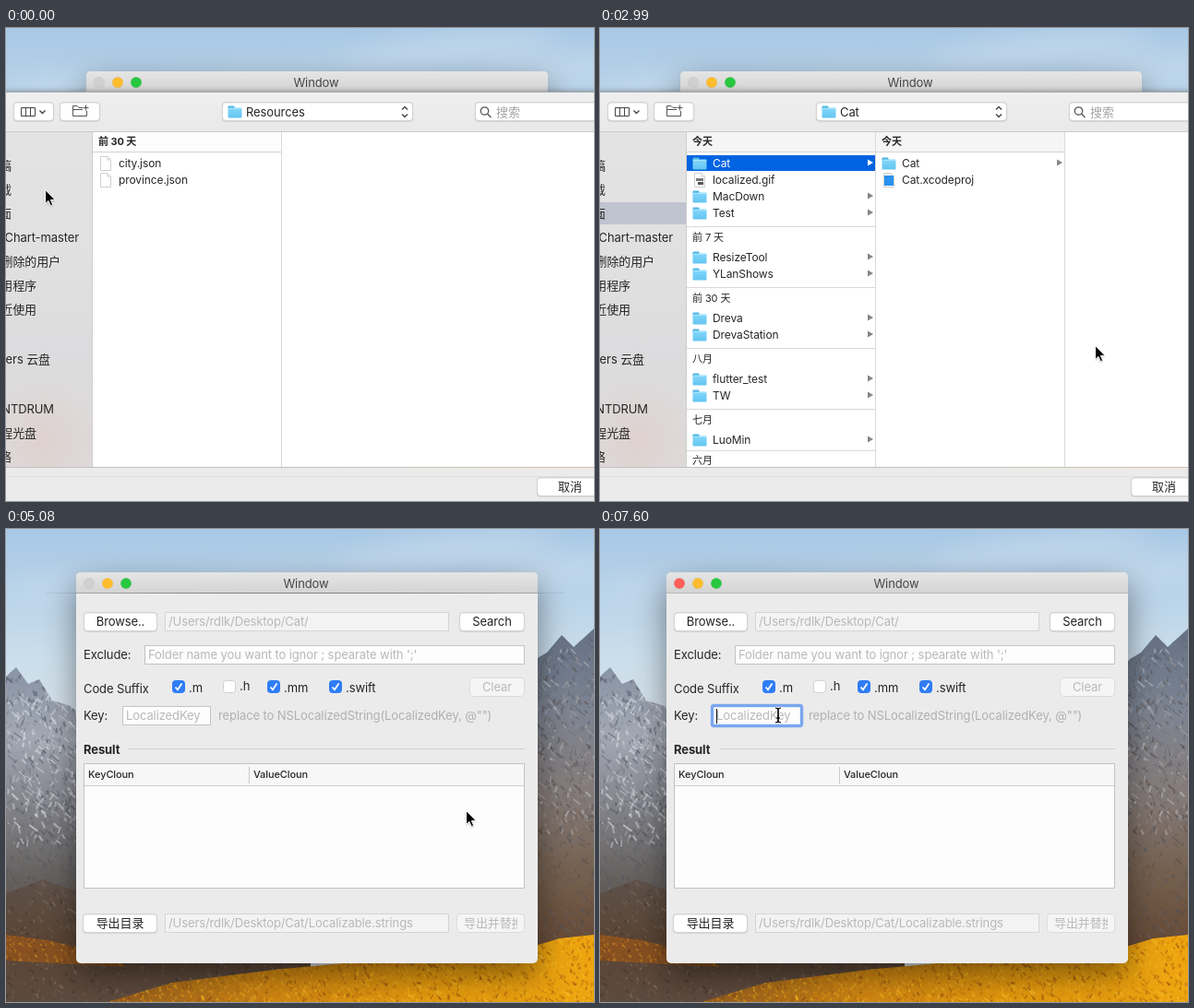
An HTML page with a canvas that plays this animation: 637x513 px, repeating every 8000 ms.

```html
<!DOCTYPE html>
<html lang="zh">
<head>
<meta charset="utf-8">
<style>
html, body { margin: 0; width: 100%; height: 100%; overflow: hidden; }
canvas { display: block; }
</style>
</head>
<body>
<canvas width="637" height="513"></canvas>
<script>
const W = 637, H = 513, LOOP = 8000, TICK = 149;
const screen = document.querySelector('canvas').getContext('2d');
let c = screen;

const smooth = p => p * p * (3 - 2 * p);
let seed = 7;
const rnd = () => (seed = seed * 16807 % 2147483647) / 2147483647;

// ---- drawing helpers ----
function text(s, x, y, { size = 13, color = '#262626', weight = 400, align = 'left' } = {}) {
  c.font = `${weight} ${size}px Inter, "Noto Sans CJK SC", "Noto Sans CJK", sans-serif`;
  c.letterSpacing = '-0.1px';
  c.textAlign = align;
  c.fillStyle = color;
  c.fillText(s, x, y + Math.round(size * .36));
}
function rect(x, y, w, h, fill) {
  c.fillStyle = fill;
  c.fillRect(x, y, w, h);
}
function box(x, y, w, h, r, fill, stroke, lineWidth = 1) {
  c.beginPath();
  c.roundRect(x + .5, y + .5, w - 1, h - 1, r);
  if (fill) { c.fillStyle = fill; c.fill(); }
  if (stroke) { c.strokeStyle = stroke; c.lineWidth = lineWidth; c.stroke(); }
}
function panel(x, y, w, h, radii, fill) {
  c.beginPath();
  c.roundRect(x, y, w, h, radii);
  c.fillStyle = fill;
  c.fill();
}
function poly(points, fill) {
  c.beginPath();
  points.forEach(([x, y]) => c.lineTo(x, y));
  c.closePath();
  if (fill) { c.fillStyle = fill; c.fill(); }
}
function line(points, color, width = 1) {
  c.beginPath();
  points.forEach(([x, y]) => c.lineTo(x, y));
  c.strokeStyle = color;
  c.lineWidth = width;
  c.stroke();
}
function dot(x, y, r, fill) {
  c.beginPath();
  c.arc(x, y, r, 0, 7);
  c.fillStyle = fill;
  c.fill();
}
function fade(x0, y0, x1, y1, ...colors) {
  const g = c.createLinearGradient(x0, y0, x1, y1);
  colors.forEach((col, i) => g.addColorStop(i / (colors.length - 1), col));
  return g;
}
function shadow(color, blur, dy) {
  c.shadowColor = color;
  c.shadowBlur = blur;
  c.shadowOffsetY = dy;
}
function button(x, y, w, label, enabled = true) {
  c.save();
  if (enabled) shadow('rgba(0,0,0,.14)', 1, .6);
  box(x, y, w, 21, 3.5, enabled ? '#fff' : '#f5f5f5', enabled ? '#d4d4d4' : '#dcdcdc');
  c.restore();
  if (label) text(label, x + w / 2, y + 10, { align: 'center', color: enabled ? '#222' : '#b9b9b9' });
}

// ---- wallpaper ----
function speckle(shape, base, colors, count, size, top, bottom) {
  c.save();
  poly(shape, base);
  c.clip();
  const xs = shape.map(p => p[0]), left = Math.min(...xs), width = Math.max(...xs) - left;
  for (let i = 0; i < count; i++) {
    const x = left + rnd() * width, y = top + rnd() * (bottom - top), l = size * (.4 + rnd());
    c.globalAlpha = .15 + rnd() * .45;
    line([[x, y], [x + (rnd() - .35) * l * 1.6, y + l * .7]], colors[rnd() * colors.length | 0], 1 + rnd() * 1.4);
  }
  c.restore();
}
function makeWallpaper() {
  const canvas = document.createElement('canvas');
  canvas.width = W;
  canvas.height = H;
  c = canvas.getContext('2d');
  rect(0, 0, W, H, fade(0, 0, 0, 210, '#a8c8e5', '#b9d3e9', '#cbdeeb', '#d6e1e9'));
  c.filter = 'blur(14px)';
  c.fillStyle = 'rgba(226,236,244,.35)';
  for (const [x, y, w, h] of [[480, 25, 120, 18], [590, 45, 80, 14], [250, 58, 150, 9], [60, 62, 60, 8]]) {
    c.beginPath();
    c.ellipse(x, y, w, h, -.12, 0, 7);
    c.fill();
  }
  c.filter = 'none';
  const left = [[0, 160], [11, 150], [24, 168], [36, 163], [50, 186], [70, 192], [92, 214], [110, H], [0, H]];
  const right = [[555, 165], [574, 141], [586, 134], [602, 115], [615, 128], [626, 118], [W, 108], [W, H], [555, H]];
  speckle(left, fade(0, 150, 0, 450, '#8893a4', '#a3a8b3', '#83848b', '#66625f', '#574a41'), ['#4a5262', '#676c78', '#565861'], 700, 7, 150, 420);
  speckle(left, 'transparent', ['#eef0f3', '#d6dae1'], 330, 8, 175, 340);
  speckle(right, fade(0, 110, 0, 460, '#657286', '#7d8492', '#857c7a', '#75604f', '#644733'), ['#4a505c', '#6d6a6c', '#5a4a42'], 600, 7, 115, 440);
  speckle(right, 'transparent', ['#c5cad2', '#b0a7a2'], 170, 7, 130, 330);
  speckle([[0, 395], [40, 380], [110, 405], [330, 465], [330, H], [0, H]], fade(0, 380, 0, H, '#5e524a', '#594434', '#5d4a3f'),
    ['#3b2f28', '#7b6757', '#6b4a30', '#8a7868'], 900, 5, 380, H);
  speckle([[0, 440], [45, 446], [110, 462], [130, 475], [0, 468]], '#875020', ['#cf8a1e', '#4a2f1d', '#b3701e', '#dfa12b'], 260, 4, 440, 475);
  speckle([[110, H], [180, 492], [290, 478], [420, 466], [570, 453], [600, 444], [W, 440], [W, H]], fade(110, 0, W, 0, '#8f5a20', '#cf8612', '#e59a0d', '#eda510'),
    ['#f6c32a', '#a85b0e', '#f0a312', '#80450f', '#fbb91b', '#d07c09'], 2400, 5, 440, H);
  c = screen;
  return canvas;
}
const wallpaper = makeWallpaper();

// ---- app window ----
const FIELDS = { exclude: [74, 126, 412], key: [50, 192, 96] };

function field(x, y, w, placeholder, focused, editable = true) {
  box(x, y, w, 21, 0, editable ? '#fdfdfd' : '#f3f3f3', editable ? '#c3c3c3' : '#d4d4d4');
  if (focused) box(x - 1, y - 1, w + 2, 23, 2, null, '#7aa6ee', 3.4);
  text(placeholder, x + 4, y + 10, { color: '#b8b8b8' });
}
function checkbox(x, on, label) {
  box(x, 164, 14, 14, 3, on ? '#2f7df6' : '#fff', on ? '#2f7df6' : '#d0d0d0');
  if (on) line([[x + 3.5, 171.5], [x + 6, 174.3], [x + 10.5, 167.5]], '#fff', 1.8);
  text(label, x + 18, on ? 172 : 170);
}
function appWindow(x, active, focus, caret) {
  c.save();
  c.translate(x, 0);
  c.save();
  shadow('rgba(0,0,0,.45)', 34, 13);
  panel(0, 47, 500, 424, 5, '#ebebeb');
  c.restore();
  panel(0, 47, 500, 23, [5, 5, 0, 0], fade(0, 47, 0, 70, '#e5e5e5', '#d3d3d3'));
  rect(0, 69, 500, 1, '#bababa');
  [active ? '#ff5f57' : '#d0d0d0', '#ffbd2e', '#28c840'].forEach((col, i) => {
    dot(14 + i * 20, 59, 6, 'rgba(0,0,0,.1)');
    dot(14 + i * 20, 59, 5.8, col);
  });
  text('Window', 249, 59, { align: 'center', color: '#454545' });

  button(8, 90, 80, 'Browse..');
  field(96, 90, 308, '/Users/rdlk/Desktop/Cat/', false, false);
  button(415, 90, 71, 'Search');
  text('Exclude:', 8, 136);
  field(...FIELDS.exclude, "Folder name you want to ignor ; spearate with ';'", focus === 'exclude');
  text('Code Suffix', 8, 173);
  checkbox(104, true, '.m');
  checkbox(159, false, '.h');
  checkbox(207, true, '.mm');
  checkbox(274, true, '.swift');
  button(426, 161, 60, 'Clear', false);
  text('Key:', 8, 202);
  field(...FIELDS.key, 'LocalizedKey', focus === 'key');
  text('replace to NSLocalizedString(LocalizedKey, @"")', 154, 202, { color: '#b0b0b0' });
  if (focus && caret) {
    const [fx, fy] = FIELDS[focus];
    rect(fx + 4, fy + 3, 1, 16, '#111');
  }

  text('Result', 8, 239, { weight: 700 });
  rect(57, 238, 429, 1, '#d0d0d0');
  box(8, 254, 478, 136, 0, '#fdfdfd', '#c2c2c2');
  rect(9, 255, 476, 23, '#f7f7f7');
  rect(9, 278, 476, 1, '#cfcfcf');
  rect(187, 258, 1, 18, '#c9c9c9');
  text('KeyCloun', 13, 266, { size: 11, weight: 500 });
  text('ValueCloun', 192, 266, { size: 11, weight: 500 });

  button(7, 417, 81, '导出目录');
  field(96, 417, 308, '/Users/rdlk/Desktop/Cat/Localizable.strings', false, false);
  button(412, 417, 74, '', false);
  c.beginPath();
  c.rect(412, 417, 66, 21);
  c.clip();
  text('导出并替换', 420, 427, { color: '#b9b9b9' });
  c.restore();
}

// ---- open dialog ----
const SIDEBAR = [
  [149, 6, '文稿'], [175, 6, '下载'], [201, 6, '桌面'], [227, 79, 'Chart-master'], [253, 59, '删除的用户'],
  [279, 33, '应用程序'], [305, 33, '最近使用'], [359, 48, 'ers 云盘'], [413, 52, 'NTDRUM'], [439, 33, '远程光盘'], [465, 6, '网络']];
const RESOURCES = '#前 30 天,city.json,province.json';
const DESKTOP = '#今天,Cat,localized.gif,MacDown,Test,#前 7 天,ResizeTool,YLanShows,#前 30 天,Dreva,DrevaStation,' +
  '#八月,flutter_test,TW,#七月,LuoMin,#六月';
const CAT = '#今天,Cat,Cat.xcodeproj';

function folder(x, y) {
  box(x, y - 7, 8, 5, 1, '#53b6e4');
  box(x, y - 5, 16, 12, 1, fade(0, y - 5, 0, y + 7, '#84d8fb', '#62c4f0'));
  rect(x + 1, y - 4, 14, 1, '#a5e4fd');
}
function page(x, y) {
  poly([[x + 2.5, y - 7.5], [x + 10, y - 7.5], [x + 13.5, y - 4], [x + 13.5, y + 7.5], [x + 2.5, y + 7.5]], '#fff');
  c.strokeStyle = '#cfcfcf';
  c.lineWidth = 1;
  c.stroke();
  line([[x + 10, y - 7.5], [x + 10, y - 4], [x + 13.5, y - 4]], '#cfcfcf');
}
function icon(name, x, y) {
  const type = name.split('.')[1];
  if (!type) return folder(x, y);
  page(x, y);
  if (type === 'gif') {
    rect(x + 4, y - 2, 8, 3, '#777');
    rect(x + 6, y + 2, 6, 3, '#555');
  }
  if (type === 'xcodeproj') rect(x + 3, y - 5, 10, 11, '#2a92ee');
}
function column(list, x, selected) {
  rect(x, 113, 204, 363, '#fff');
  rect(x, 113, 204, 21, list === RESOURCES ? '#fdfdfd' : '#f5f5f5');
  rect(x, 134, 204, 1, '#d3d3d3');
  rect(x + 204, 113, 1, 363, '#d9d9d9');
  let y = 123;
  list.split(',').forEach((name, i) => {
    if (name[0] === '#') {
      if (i) {
        y = Math.min(y + 8, 469);
        rect(x, y - 12 + (y === 469), 204, 1, '#d9d9d9');
      }
      text(name.slice(1), x + 6, y, { size: 11, weight: i ? 400 : 700 });
      y += i ? 22 : 24;
      return;
    }
    const on = name === selected;
    if (on) rect(x, y - 9, 204, 17, '#0063e1');
    icon(name, x + 6, y);
    text(name, x + 28, y, { size: 12, color: on ? '#fff' : '#262626' });
    if (!name.includes('.')) poly([[x + 196, y - 4.5], [x + 202, y - 1], [x + 196, y + 2.5]], on ? '#fff' : '#858585');
    y += 18;
  });
}
function dialog(place) {
  c.save();
  shadow('rgba(0,0,0,.5)', 7, 0);
  rect(-20, 70, 680, 460, '#ececec');
  c.restore();
  rect(0, 69, W, 1, '#a9a9a9');
  rect(0, 70, W, 42, fade(0, 70, 0, 112, '#efefef', '#e9e9e9'));
  rect(0, 112, W, 1, '#cbcbcb');

  button(8, 80, 44);
  box(16, 86, 16, 10, 0, null, '#444');
  rect(21, 86, 1, 10, '#444');
  rect(26, 86, 1, 10, '#444');
  line([[36.5, 89.5], [39.5, 92.5], [42.5, 89.5]], '#444', 1.4);
  button(58, 80, 44);
  line([[83, 86.5], [79, 86.5], [77, 84.5], [72.5, 84.5], [72.5, 95.5], [87.5, 95.5], [87.5, 90]], '#555');
  line([[72, 88.5], [83, 88.5]], '#555');
  line([[83.5, 86.5], [89.5, 86.5]], '#555');
  line([[86.5, 83.5], [86.5, 89.5]], '#555');
  button(234, 80, 207);
  folder(240, 91);
  if (place === '桌面') rect(244, 89, 9, 6, '#2f8fc4');
  text(place, 260, 91);
  line([[429, 88.5], [432, 85.5], [435, 88.5]], '#444', 1.4);
  line([[429, 93.5], [432, 96.5], [435, 93.5]], '#444', 1.4);
  button(508, 80, 160);
  c.beginPath();
  c.arc(518.5, 90, 4.2, 0, 7);
  c.strokeStyle = '#555';
  c.lineWidth = 1.3;
  c.stroke();
  line([[521.5, 93], [525.5, 97]], '#555', 1.5);
  text('搜索', 531, 91, { color: '#a5a5a5' });

  rect(0, 113, 93, 363, fade(0, 113, 0, 476, '#e3e3e4', '#e1e1e2', '#dcdcde', '#dedbda'));
  const glow = c.createRadialGradient(40, 445, 5, 40, 445, 70);
  glow.addColorStop(0, 'rgba(222,196,192,.4)');
  glow.addColorStop(1, 'rgba(222,196,192,0)');
  rect(0, 375, 93, 101, glow);
  rect(93, 113, 1, 363, '#cdcdcd');
  if (place !== 'Resources') rect(0, 189, 93, 24, '#c0c4d0');
  for (const [y, x, label] of SIDEBAR) text(label, x, y, { align: 'right' });

  rect(94, 113, W, 363, '#fff');
  column(place === 'Resources' ? RESOURCES : DESKTOP, 94, place);
  if (place === 'Cat') column(CAT, 299);

  rect(0, 476, W, 37, '#ebebeb');
  rect(0, 476, W, 1, fade(0, 0, W, 0, '#bfbfbf', '#bfbfbf', '#d2bfa6'));
  rect(0, 486, W, 1, '#e0e0e0');
  button(575, 487, 90);
  text('取消', 598, 497);
}

// ---- pointer ----
const TRACKS = [
  [[0, 42, 175], [4, 6, 206], [7, 6, 206], [12, 163, 146], [15, 163, 146], [22, 628, 393], [23, 628, 393]],
  [[27, 634, 494], [27, 634, 494]],
  [[34, 498, 305], [35, 474, 264], [36, 443, 205], [37, 443, 205], [41, 290, 136], [42, 290, 136],
    [45, 228, 206], [46, 232, 203], [49, 114, 210], [51, 193, 202], [53, 193, 202]]];

function pointerAt(tick) {
  const track = TRACKS.find(t => tick >= t[0][0] && tick <= t[t.length - 1][0]);
  if (!track) return null;
  const i = Math.max(1, track.findIndex(p => p[0] >= tick));
  const [a, b] = [track[i - 1], track[i]];
  const p = smooth((tick - a[0]) / (b[0] - a[0] || 1));
  return [1, 2].map(n => Math.round(a[n] + (b[n] - a[n]) * p));
}
function arrow(x, y) {
  c.save();
  c.translate(x + .5, y + .5);
  shadow('rgba(0,0,0,.35)', 2, 1);
  poly([[0, 0], [0, 15], [3.4, 11.9], [5.8, 17.2], [8.2, 16.2], [5.9, 11], [10.6, 10.8]], '#000');
  c.shadowColor = 'transparent';
  c.strokeStyle = '#fff';
  c.lineWidth = 1;
  c.stroke();
  c.restore();
}
function beam(x, y) {
  for (const [color, width] of [['rgba(255,255,255,.8)', 3], ['#000', 1.2]]) {
    line([[x - 3, y - 8], [x, y - 7], [x, y + 7], [x - 3, y + 8]], color, width);
    line([[x + 3, y - 8], [x, y - 7], [x, y + 7], [x + 3, y + 8]], color, width);
    line([[x - 2, y + 3], [x + 2, y + 3]], color, width);
  }
}

// ---- timeline ----
function draw(time) {
  const tick = Math.min(53, Math.floor((time % LOOP + 6) / TICK));
  const open = tick < 32;
  const back = open ? 0 : smooth(Math.min(1, (tick - 32) / 3));
  const x = Math.round(87 - 15 * back);
  const active = tick >= 36;
  const focus = active && (tick < 50 ? 'exclude' : 'key');

  c.drawImage(wallpaper, 0, 0);
  appWindow(x, active, focus, tick >= 50 || (tick > 37 && tick < 42));
  if (open) dialog(tick < 4 ? 'Resources' : tick < 14 ? '桌面' : 'Cat');
  else if (!active) {
    const l = 8 + 47 * back, r = 637 - 42 * back;
    rect(l, 69, r - l, 1, fade(l, 0, r, 0, 'rgba(70,75,85,.1)', 'rgba(70,75,85,.5)', 'rgba(70,75,85,.5)', 'rgba(70,75,85,.1)'));
    if (tick === 35) rect(524, 70, 42, 1, '#6f9fdc');
  }

  const pointer = pointerAt(tick);
  if (!pointer) return;
  const [px, py] = pointer;
  const inField = active && Object.values(FIELDS).some(([fx, fy, w]) => px > x + fx && px < x + fx + w && py >= fy && py <= fy + 21);
  (inField ? beam : arrow)(px, py);
}
function loop() {
  draw(performance.now());
  requestAnimationFrame(loop);
}
loop();
</script>
</body>
</html>
```
